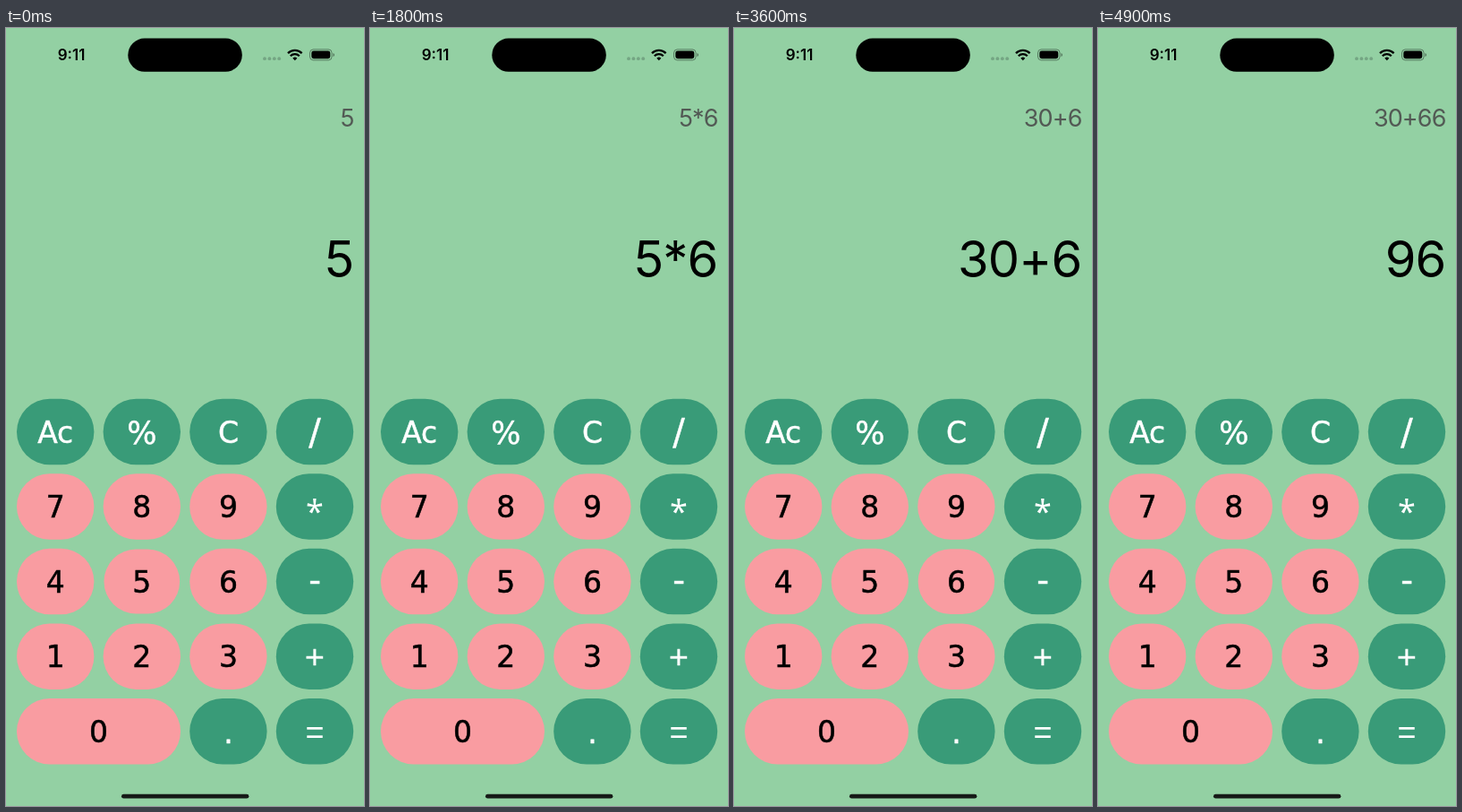
An HTML page that plays this animation: 400x868 px, repeating every 5.8 s.

```html
<!DOCTYPE html>
<html lang="en">
<head>
<meta charset="utf-8">
<title>Calculator</title>
<style>
  html, body { margin: 0; width: 100%; height: 100%; overflow: hidden; background: #93d0a3; }
  svg { display: block; width: 100%; height: 100%; }
  .screen { font-family: Inter, "Liberation Sans", sans-serif; font-feature-settings: "calt" 0; text-anchor: end; }
  .clock { font: 600 17px Inter, sans-serif; text-anchor: middle; }
  .key text { font-family: "DejaVu Sans", sans-serif; text-anchor: middle; stroke-width: .5; }
  .key rect { transform-box: fill-box; transform-origin: center; }
</style>
</head>
<body>
<svg viewBox="0 0 400 868" xmlns="http://www.w3.org/2000/svg">
  <rect width="400" height="868" fill="#93d0a3"/>
  <text class="clock" x="73" y="36">9:11</text>
  <rect x="136.3" y="11.5" width="127.5" height="37.3" rx="18.6"/>
  <g fill="#74a583">
    <circle cx="289" cy="34.2" r="1.9"/><circle cx="294.4" cy="34.2" r="1.9"/>
    <circle cx="299.8" cy="34.2" r="1.9"/><circle cx="305.2" cy="34.2" r="1.9"/>
  </g>
  <g fill="none" stroke="#000" stroke-width="2.3">
    <path d="M315 28.1a11 11 0 0 1 15.6 0"/>
    <path d="M317.8 31.2a7.1 7.1 0 0 1 10 0"/>
  </g>
  <path d="M322.8 36.3l-2.5-2.6a3.6 3.6 0 0 1 5 0z"/>
  <rect x="339.5" y="23.9" width="24.6" height="12" rx="3.9" fill="none" stroke="#000" stroke-opacity=".4"/>
  <rect x="341.3" y="25.6" width="21" height="8.6" rx="2.4"/>
  <path d="M365.5 28v4q1.5-.5 1.5-2t-1.5-2z" opacity=".45"/>
  <text id="past" class="screen" x="388.5" y="110.4" font-size="27" letter-spacing="-.9" fill="#525954"></text>
  <text id="main" class="screen" x="388.5" y="277.5" font-size="56" letter-spacing="-.8"></text>
  <g id="pad"></g>
  <rect x="129" y="854.7" width="142.4" height="4.9" rx="2.45" fill="#161a17"/>
</svg>
<script>
const NS = "http://www.w3.org/2000/svg";
const LOOP = 5800, STEP = 100;
const GREEN = "#399b78", PINK = "#f99ca1";
const $ = id => document.getElementById(id);

// Glyph styling: size, baseline below the key centre, font
const looks = {
  "%": [35, 13.2], "/": [40, 14.5], "-": [38, 11], "+": [29, 10],
  "*": [36, 17.5, "Noto Sans"], "=": [36, 13, "Liberation Sans"], ".": [33, 13.2]
};
const rows = [["Ac", "%", "C", "/"], ["7", "8", "9", "*"], ["4", "5", "6", "-"],
              ["1", "2", "3", "+"], ["0", "", ".", "="]];
const keys = {};

function add(parent, tag, attrs) {
  const el = document.createElementNS(NS, tag);
  for (const name in attrs) el.setAttribute(name, attrs[name]);
  return parent.appendChild(el);
}

function addKey(name, col, row) {
  const digit = /\d/.test(name);
  const x = 12 + col * 96.6, y = 413.7 + row * 83.57;
  const w = name === "0" ? 183 : 86.4, h = 73.5;
  const [size, drop, font] = looks[name] || [33, 12.2];
  const ink = digit ? "#000" : "#fff";
  const g = add($("pad"), "g", { class: "key" });
  const rect = add(g, "rect", { x, y, width: w, height: h, rx: h / 2, fill: digit ? PINK : GREEN });
  const label = add(g, "text", { x: x + w / 2, y: y + h / 2 + drop, fill: ink, stroke: ink, "font-size": size });
  if (font) {
    label.style.fontFamily = `"${font}", sans-serif`;
    label.style.strokeWidth = 0;
  }
  label.textContent = name;
  keys[name] = { rect, label, dim: digit ? 0.8 : 0.62 };
}

rows.forEach((row, r) => row.forEach((name, c) => name && addKey(name, c, r)));

// Each tap: key, time down, time up, main line, upper line
const taps = [
  ["5", -100, 0, "5", "5"],
  ["*", 700, 800, "5*", "5"],
  ["6", 1400, 1600, "5*6", "5*6"],
  ["=", 2100, 2200, "30", "5*6"],
  ["+", 2700, 2800, "30+", "5*6"],
  ["6", 3400, 3500, "30+6", "30+6"],
  ["6", 3900, 4000, "30+66", "30+66"],
  ["=", 4600, 4700, "96", "30+66"]
];

function draw(time) {
  const t = Math.floor((time % LOOP) / STEP) * STEP;
  for (const name in keys) {
    keys[name].label.style.opacity = 1;
    keys[name].rect.style.transform = "none";
  }
  for (const [name, down, up, main, past] of taps) {
    const key = keys[name];
    if (t >= down && t < up) key.label.style.opacity = key.dim;
    if (t < up) continue;
    $("main").textContent = main;
    $("past").textContent = past;
    const shrink = Math.max(0, 0.02 - (t - up) / STEP * 0.01);
    if (shrink) key.rect.style.transform = `scale(${1 - shrink})`;
  }
}

const start = performance.now();
function tick(now) {
  draw(Math.max(0, now - start));
  requestAnimationFrame(tick);
}
draw(0);
requestAnimationFrame(tick);
</script>
</body>
</html>
```
